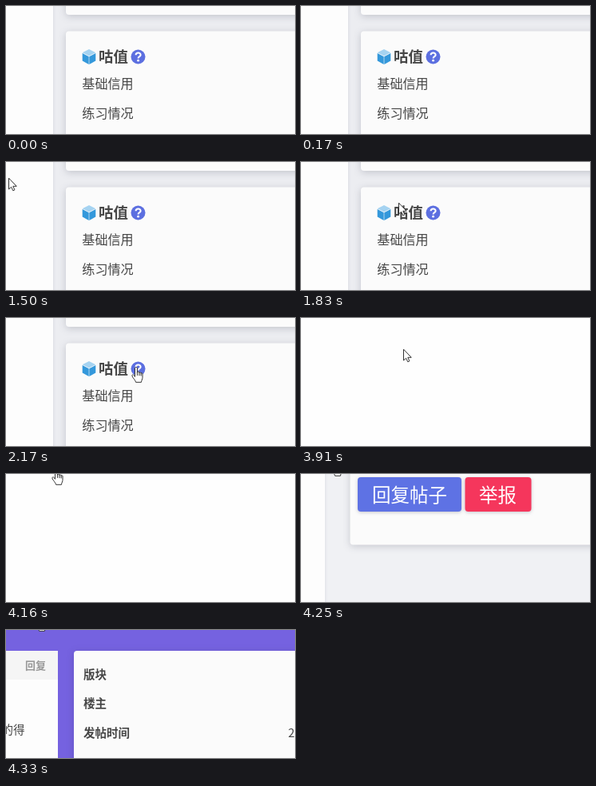
These frames come from a looping animation (362x160 px, 4.41 s). An HTML page:

```html
<!DOCTYPE html>
<html lang="zh-CN">
<head>
<meta charset="utf-8">
<title>Page tour</title>
<style>
  html, body { margin: 0; width: 100%; height: 100%; overflow: hidden; background: #fefefe; }
  svg { display: block; width: 362px; height: 160px; }
  text { font-family: "Noto Sans CJK SC", "Noto Sans CJK", sans-serif; fill: #464646; }
  .scene { visibility: hidden; }
  .card { fill: #fbfbfb; filter: drop-shadow(0 2px 5px rgba(30, 35, 60, .2)); }
  .side { fill: #fdfdfd; filter: drop-shadow(1px 0 1.5px rgba(30, 35, 60, .08)); }
  .btn { filter: drop-shadow(0 1px 2px rgba(30, 35, 60, .25)); }
  .b { font-weight: 700; }
  .white { fill: #fff; }
  .pointer path { fill: #fff; stroke: #333; stroke-width: 1; stroke-linejoin: round; stroke-linecap: round; }
</style>
</head>
<body>
<svg viewBox="0 0 362 160">
  <rect width="362" height="160" fill="#fefefe"/>

  <g class="scene" id="profile">
    <rect width="362" height="160" fill="#ecedf1"/>
    <rect class="side" x="-10" y="-10" width="69" height="180"/>
    <rect class="card" x="75" y="-30" width="310" height="41" rx="4"/>
    <rect class="card" x="75" y="31.5" width="310" height="160" rx="4"/>
    <path d="M104 54 L112.3 58.2 L104 62.6 L95.7 58.2Z" fill="#a5d3f1"/>
    <path d="M95.7 59 L103.7 63.2 V73 L95.7 68.5Z" fill="#3498db"/>
    <path d="M112.3 59 L104.3 63.2 V73 L112.3 68.5Z" fill="#3498db"/>
    <text class="b" x="116" y="70.2" font-size="18.4">咕值</text>
    <circle cx="165.5" cy="63.5" r="9" fill="#5c6fe0"/>
    <path d="M162.6 61.2 C162.8 57.5 168.8 57.8 168.6 61.2 C168.5 63.2 165.6 63 165.6 65.4" fill="none" stroke="#fff" stroke-width="2.1"/>
    <circle cx="165.6" cy="68.2" r="1.4" class="white"/>
    <text x="95.3" y="103" font-size="16.1">基础信用</text>
    <text x="95.3" y="139.8" font-size="16.1">练习情况</text>
  </g>

  <g class="scene" id="actions">
    <rect width="362" height="160" fill="#f0f1f4"/>
    <rect class="side" x="-10" y="-10" width="40" height="180"/>
    <rect class="card" x="61.5" y="-30" width="330" height="118.5" rx="4"/>
    <rect class="btn" x="71" y="4" width="130" height="43" rx="4" fill="#5e72e4"/>
    <rect class="btn" x="205.5" y="4" width="83" height="43" rx="4" fill="#f5365c"/>
    <text class="white" x="89" y="34.8" font-size="23.5">回复帖子</text>
    <text class="white" x="223" y="34.8" font-size="23.5">举报</text>
  </g>

  <g class="scene" id="thread">
    <rect width="362" height="160" fill="#7562e0"/>
    <rect x="-10" y="26" width="75" height="150" fill="#fdfdfd"/>
    <rect x="-10" y="26" width="75" height="36" fill="#f5f5f5"/>
    <rect class="card" x="85" y="26" width="300" height="160" rx="4"/>
    <text class="b" x="24" y="48.5" font-size="13" style="fill:#999">回复</text>
    <text x="-5.5" y="130" font-size="14.5">的得</text>
    <text class="b" x="97" y="60.5" font-size="14.5">版块</text>
    <text class="b" x="97" y="97" font-size="14.5">楼主</text>
    <text class="b" x="97" y="134" font-size="14.5">发帖时间</text>
    <text x="353.5" y="133.5" font-size="14.5">2</text>
  </g>

  <g class="scene pointer" id="arrow">
    <path d="M.5 .5 V14 L3.6 11.2 L5.8 15.8 L7.9 14.8 L5.8 10.3 H9.8Z"/>
  </g>
  <g class="scene pointer" id="hand">
    <path d="M4.5 12 V2 C4.5 0 7.4 0 7.4 2 V7.2 C7.6 5.6 9.8 5.8 9.9 7.5 C10.2 6.3 12 6.6 12.1 8.2 C12.5 7.2 14 7.6 14 9 V13.2 C14 15.4 12.9 16.4 12.4 19.3 H5.6 C5.2 17 2.2 14.3 1 11.6 C.4 10 2.3 9.2 3.2 10.4Z"/>
    <path d="M7.4 7 V10.5 M9.9 7.5 V10.8 M12.1 8.2 V11" fill="none"/>
  </g>
</svg>
<script>
  const LOOP = 4410;
  const ids = ["profile", "actions", "thread", "arrow", "hand"];
  const parts = Object.fromEntries(ids.map(id => [id, document.getElementById(id)]));
  const ease = p => p * p * (3 - 2 * p);

  // Arrow moves between two points, one position per time
  const glide = (times, scene, from, to) => times.map((t, i) => {
    const p = ease(i / times.length);
    return [t, scene, "arrow", ...from.map((a, k) => Math.round(a + (to[k] - a) * p))];
  });

  // time, scene, pointer, x, y
  const steps = [
    [0, "profile"],
    ...glide([1500, 1580, 1670, 1750, 1830, 1920], "profile", [3, 20], [163, 62]),
    [2000, "profile", "hand", 156, 61],
    [2170, "profile", "hand", 157, 61],
    ...glide([3500, 3830, 3910, 4000, 4080], "", [163, 62], [63, -4]),
    [4160, "", "hand", 57, -6],
    [4250, "actions", "hand", 37, -17],
    [4330, "thread", "hand", 36, -18]
  ];

  let shown;
  function draw(now) {
    const t = now % LOOP;
    const step = steps.findLast(s => s[0] <= t);
    if (step !== shown) {
      shown = step;
      const [, scene, pointer, x, y] = step;
      for (const id of ids)
        parts[id].style.visibility = id === scene || id === pointer ? "visible" : "hidden";
      if (pointer) parts[pointer].setAttribute("transform", `translate(${x} ${y})`);
    }
  }

  const start = performance.now();
  function tick() {
    draw(performance.now() - start);
    requestAnimationFrame(tick);
  }
  tick();
</script>
</body>
</html>
```
